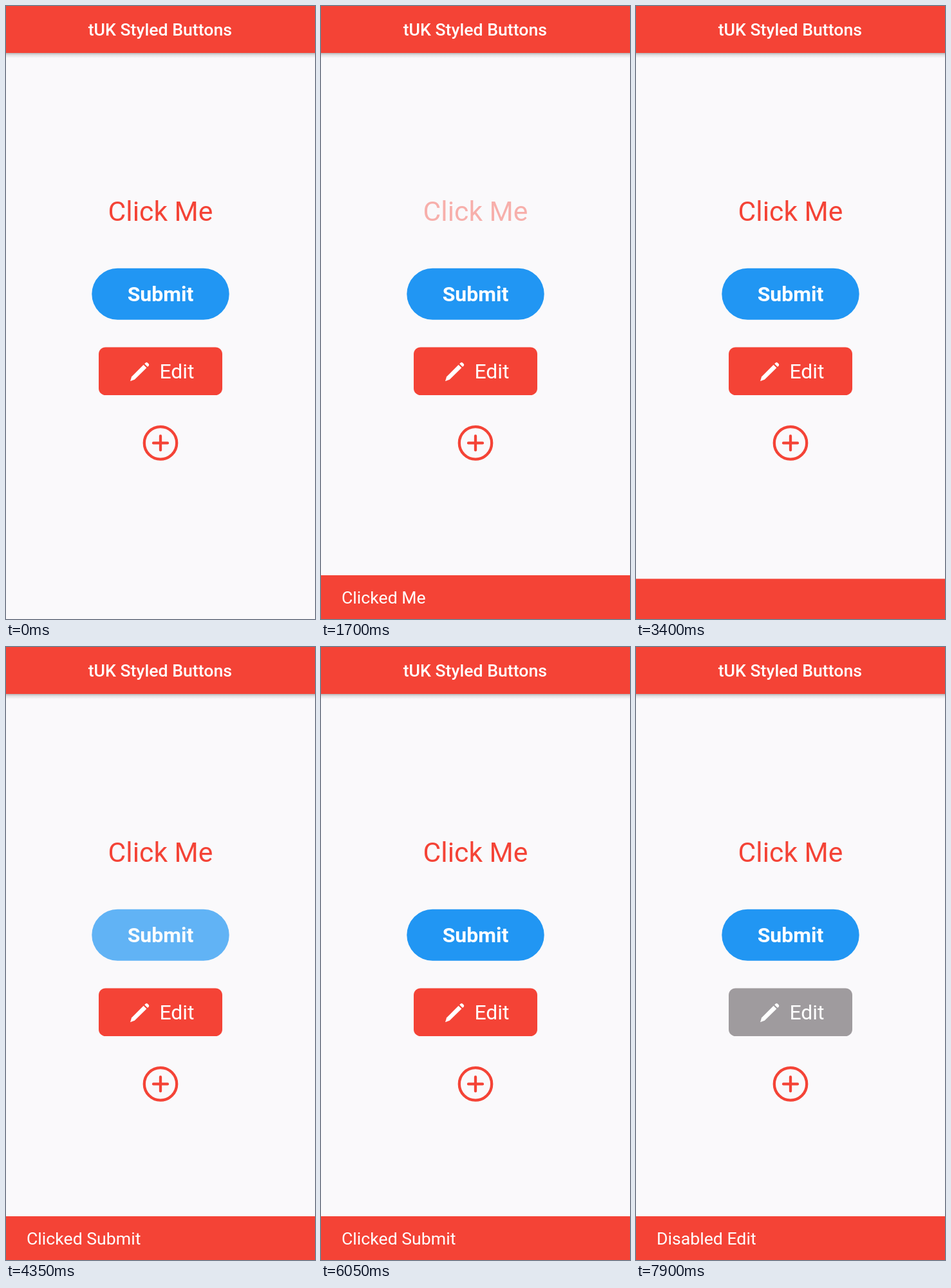
These frames come from a looping animation (480 px wide and 953 px high, 8000 ms). An HTML page:

```html
<!DOCTYPE html>
<html lang="en">
<head>
<meta charset="utf-8">
<title>Styled Buttons</title>
<style>
  html, body { margin: 0; width: 100%; height: 100%; overflow: hidden; background: #faf9fb; }
  svg { display: block; width: 100%; height: 100%; font-family: Roboto, sans-serif; }
</style>
</head>
<body>
<svg viewBox="0 0 480 953">
  <defs>
    <linearGradient id="shade" x1="0" y1="0" x2="0" y2="1">
      <stop offset="0" stop-color="#000" stop-opacity=".27"/>
      <stop offset=".4" stop-color="#000" stop-opacity=".1"/>
      <stop offset="1" stop-color="#000" stop-opacity="0"/>
    </linearGradient>
  </defs>
  <rect width="480" height="953" fill="#faf9fb"/>

  <rect y="73" width="480" height="8" fill="url(#shade)"/>
  <rect width="480" height="73" fill="#f44336"/>
  <text x="351" y="46" text-anchor="end" font-size="26.67" font-weight="500" fill="#fff">tUK Styled Buttons</text>

  <text id="click" x="240" y="333.5" text-anchor="middle" font-size="42.67" fill="#f44336">Click Me</text>

  <g id="submit">
    <rect x="133.3" y="407.7" width="213.4" height="80" rx="40" fill="#2196f3"/>
    <text x="240" y="458.7" text-anchor="middle" font-size="32" font-weight="700" fill="#fff">Submit</text>
  </g>

  <g id="edit" fill="#fff">
    <rect id="editBox" x="144" y="530.4" width="192" height="74.7" rx="10.67"/>
    <path d="M193 583.2 L195.2 576.2 L213.6 557.8 L218.4 562.6 L199.8 580.8 Z"/>
    <path d="M215.2 556.3 L217 554.6 Q218.5 553.4 220 554.7 L221.6 556.3 Q222.9 557.9 221.7 559.3 L219.9 561.1 Z"/>
    <text x="238.4" y="578.7" font-size="32">Edit</text>
  </g>

  <g fill="none" stroke="#f44336" stroke-width="4.3" stroke-linecap="round">
    <circle cx="240" cy="679.4" r="25.2"/>
    <path d="M229 679.4 H251 M240 668.4 V690.4"/>
  </g>

  <g id="bar">
    <rect width="480" height="69" fill="#f44336"/>
    <text id="note" x="32" y="44" font-size="26.67" fill="#fff"></text>
  </g>
</svg>
<script>
const LOOP = 8000, BAR_TOP = 885, BAR_HEIGHT = 68, ENTRY = 250;
const $ = id => document.getElementById(id);
const clamp = x => Math.min(1, Math.max(0, x));

// press and release times per button, with the pressed opacity
const buttons = [
  { id: 'click', dim: 0.4, taps: [[45, 500], [1150, 1950]] },
  { id: 'submit', dim: 0.7, taps: [[2590, 3235], [4145, 5033]] },
  { id: 'edit', dim: 0.4, taps: [[6395, 7385]] }
];

// each message replaces the one before it at once, then slides in
const messages = [
  { shown: 500, start: 500, text: 'Clicked Me' },
  { shown: 1990, start: 1928, text: 'Clicked Me' },
  { shown: 3235, start: 3235, text: 'Clicked Submit' },
  { shown: 5033, start: 5033, text: 'Clicked Submit' },
  { shown: 7385, start: 7385, text: 'Disabled Edit' }
];

function bezier(x1, y1, x2, y2) {
  const curve = (a, b, s) => 3 * (1 - s) * (1 - s) * s * a + 3 * (1 - s) * s * s * b + s ** 3;
  return x => {
    if (x <= 0 || x >= 1) return clamp(x);
    let lo = 0, hi = 1;
    for (let i = 0; i < 24; i++) {
      const mid = (lo + hi) / 2;
      if (curve(x1, x2, mid) < x) lo = mid; else hi = mid;
    }
    return curve(y1, y2, lo);
  };
}
const fastOutSlowIn = bezier(0.4, 0, 0.2, 1);
const easeInOut = bezier(0.42, 0, 0.58, 1);

function pressAmount(taps, t) {
  const tap = taps.filter(([down]) => t >= down).pop();
  if (!tap) return 0;
  const [down, up] = tap;
  if (t < up) return easeInOut(clamp((t - down) / 120));
  return (1 - clamp((t - up) / 180)) ** 3;
}

function draw(t) {
  for (const { id, dim, taps } of buttons) {
    const fade = 1 - (1 - pressAmount(taps, t)) ** 2;
    $(id).setAttribute('opacity', 1 - (1 - dim) * fade);
  }
  $('editBox').setAttribute('fill', t < 7385 ? '#f44336' : '#9f9b9e');

  const message = messages.filter(m => t >= m.shown).pop();
  const v = message ? clamp((t - message.start) / ENTRY) : 0;
  const y = BAR_TOP + BAR_HEIGHT * (1 - fastOutSlowIn(v));
  $('bar').setAttribute('transform', `translate(0 ${y})`);
  $('bar').setAttribute('visibility', message ? 'visible' : 'hidden');
  $('note').textContent = message ? message.text : '';
  $('note').setAttribute('opacity', fastOutSlowIn(clamp((v - 0.72) / 0.28)));
}

const begin = performance.now();
function tick() {
  draw((performance.now() - begin) % LOOP);
  requestAnimationFrame(tick);
}
draw(0);
requestAnimationFrame(tick);
</script>
</body>
</html>
```
